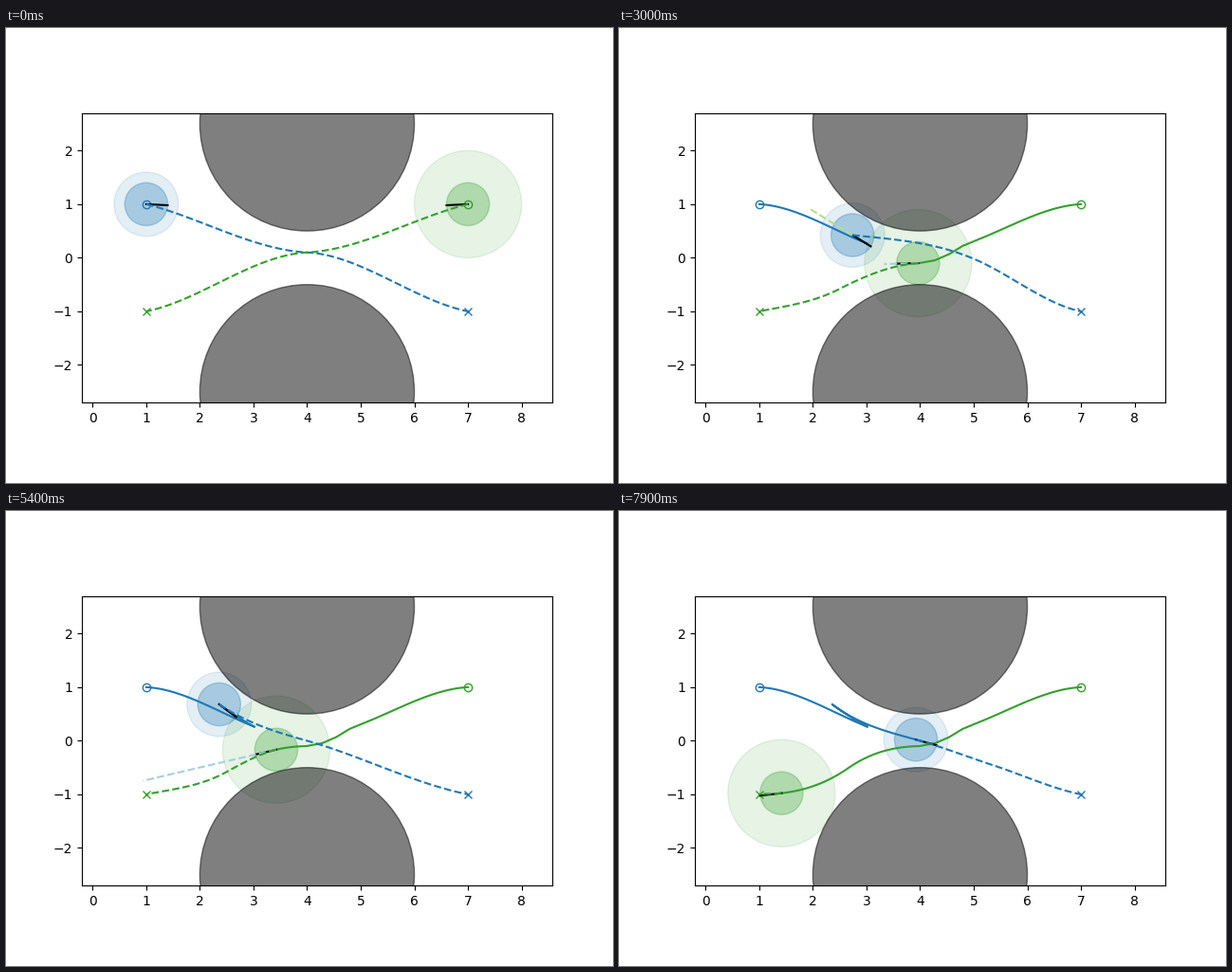
These frames come from a looping animation (640 px wide and 480 px high, 8 s). A matplotlib script:

```python
import numpy as np
import matplotlib.pyplot as plt
from matplotlib.animation import FuncAnimation
from matplotlib.patches import Circle

FRAMES = 80
TIMES = np.arange(FRAMES)


def spline(nodes, q):
    """Hermite curve through (x, y, slope) nodes in rising x."""
    x, y, m = np.array(nodes, float).T
    i = np.clip(np.searchsorted(x, q, side="right") - 1, 0, len(x) - 2)
    h = x[i + 1] - x[i]
    t = (q - x[i]) / h
    return (y[i] + (y[i + 1] - y[i]) * t * t * (3 - 2 * t)
            + h * t * (1 - t) * (m[i] * (1 - t) - m[i + 1] * t))


def drive(legs):
    """Follow legs of (start time, x, speed, acceleration, lane)."""
    states = []
    for n in TIMES:
        start, x, v, a, lane = [leg for leg in legs if leg[0] <= n][-1]
        x += v * (n - start) + a * (n - start) ** 2 / 2
        rise = spline(lane, x + .01) - spline(lane, x - .01)
        states.append((x, spline(lane, x), np.arctan(rise / .02)))
    return np.array(states).T


def keyed(rows):
    """Blend rows of (time, values...) linearly over every frame."""
    cols = np.array(rows, float).T
    return np.array([np.interp(TIMES, cols[0], c) for c in cols[1:]]).T


class Robot:
    def __init__(self, ax, color, pale, reach, legs, hint, via, mirrored=False):
        self.x, self.y, self.angle = drive(legs)
        if mirrored:
            self.angle += np.pi
        self.hint = keyed(hint)[:, 0]
        self.via = keyed(via)
        self.mirrored = mirrored
        self.discs = [ax.add_patch(Circle((0, 0), r, color=color, alpha=a))
                      for r, a in ((reach, .12), (.4, .3))]
        start, goal = (7, 1) if mirrored else (1, 7)
        ax.plot(start, 1, "o", mfc="none", mec=color)
        ax.plot(goal, -1, "x", color=color)
        self.trail, = ax.plot([], [], color=color, zorder=2.1)
        self.nose, = ax.plot([], [], "k", zorder=2.2)
        self.ray, = ax.plot([], [], "--", color=pale, zorder=2.3)
        self.ahead, = ax.plot([], [], "--", color=color, zorder=2.4)

    def flip(self, x):
        return 8 - x if self.mirrored else x

    def road(self, n):
        """Planned way: robot, one via point, goal."""
        lean, *via = self.via[n]
        u = self.flip(self.x[n])
        us = np.linspace(u, 7, 80)
        nodes = [(u, self.y[n], lean), via, (7, -1, -.2)]
        return self.flip(us), spline(nodes, us)

    def segment(self, n, length):
        x, y, a = self.x[n], self.y[n], self.angle[n]
        return [x, x + length * np.cos(a)], [y, y + length * np.sin(a)]

    def show(self, n):
        for disc in self.discs:
            disc.center = self.x[n], self.y[n]
        self.nose.set_data(*self.segment(n, .4))
        self.ray.set_data(*self.segment(n, self.hint[n]))
        self.ray.set_visible(18 <= n <= 66)
        self.ahead.set_data(*self.road(n))
        self.trail.set_data(self.x[:n + 1], self.y[:n + 1])


fig, ax = plt.subplots(figsize=(6.4, 4.8), dpi=100)
ax.set_aspect("equal")
ax.set_xlim(-.2, 8.5726)
ax.set_ylim(-2.7, 2.7)
ax.set_xticks(range(9))
ax.set_yticks(range(-2, 3))

for cy in (-2.5, 2.5):
    ax.add_patch(Circle((4, cy), 2, color="black", alpha=.5, zorder=1.5))

# Blue drives in, backs off to let green pass, then goes on.
advance = [(1, 1, -.05), (3.02, .26, -.4)]
retreat = [(2.36, .68, -.75), (3.02, .26, -.55)]
resume = [(2.36, .68, -.75), (4, 0, -.28)]
blue = Robot(
    ax, "#1f78b4", "#b2df8a", .6,
    legs=[(0, 1, 0, .0136, advance), (15, 2.53, .204, -.0271, advance),
          (18, 3.02, -.0259, .00042, retreat), (54, 2.36, 0, .005, resume)],
    hint=[(18, 0), (21, -.87), (38, -.97), (54, 0), (66, 1.2)],
    via=[(0, -.25, 4, .1, -.05), (12, -.4, 4, 0, -.28),
         (21, 0, 5.5, .03, -.4), (38, -.2, 5, -.27, -.6),
         (54, -.67, 4, 0, -.28), (63, -.6, 5, -.33, -.5),
         (79, -.28, 5.4, -.47, -.33)])

# Green waits in the gap until blue has made room.
lane = [(1, -1, 0), (2.66, -.51, .7), (3.98, -.1, .02), (4.45, .02, .45),
        (4.9, .27, .36), (7, 1, .05)]
green = Robot(
    ax, "#33a02c", "#a6cee3", 1,
    legs=[(0, 7, 0, -.0136, lane), (21, 3.98, -.0018, 0, lane),
          (38, 3.95, 0, -.0041, lane), (63, 2.67, -.1, .0027, lane)],
    hint=[(21, 0), (38, 1.2), (54, 2.55), (63, 1.9)],
    via=[(0, -.25, 4, .1, -.05), (12, -.4, 4, 0, -.28),
         (21, 0, 5.5, -.58, -.5), (54, -.25, 5.5, -.58, -.55),
         (63, -.6, 6, -.86, -.35), (79, -.05, 6.8, -.99, -.05)],
    mirrored=True)


def draw(n):
    blue.show(n)
    green.show(n)
    return []


anim = FuncAnimation(fig, draw, frames=FRAMES, interval=100, repeat=True)
plt.show()
```
